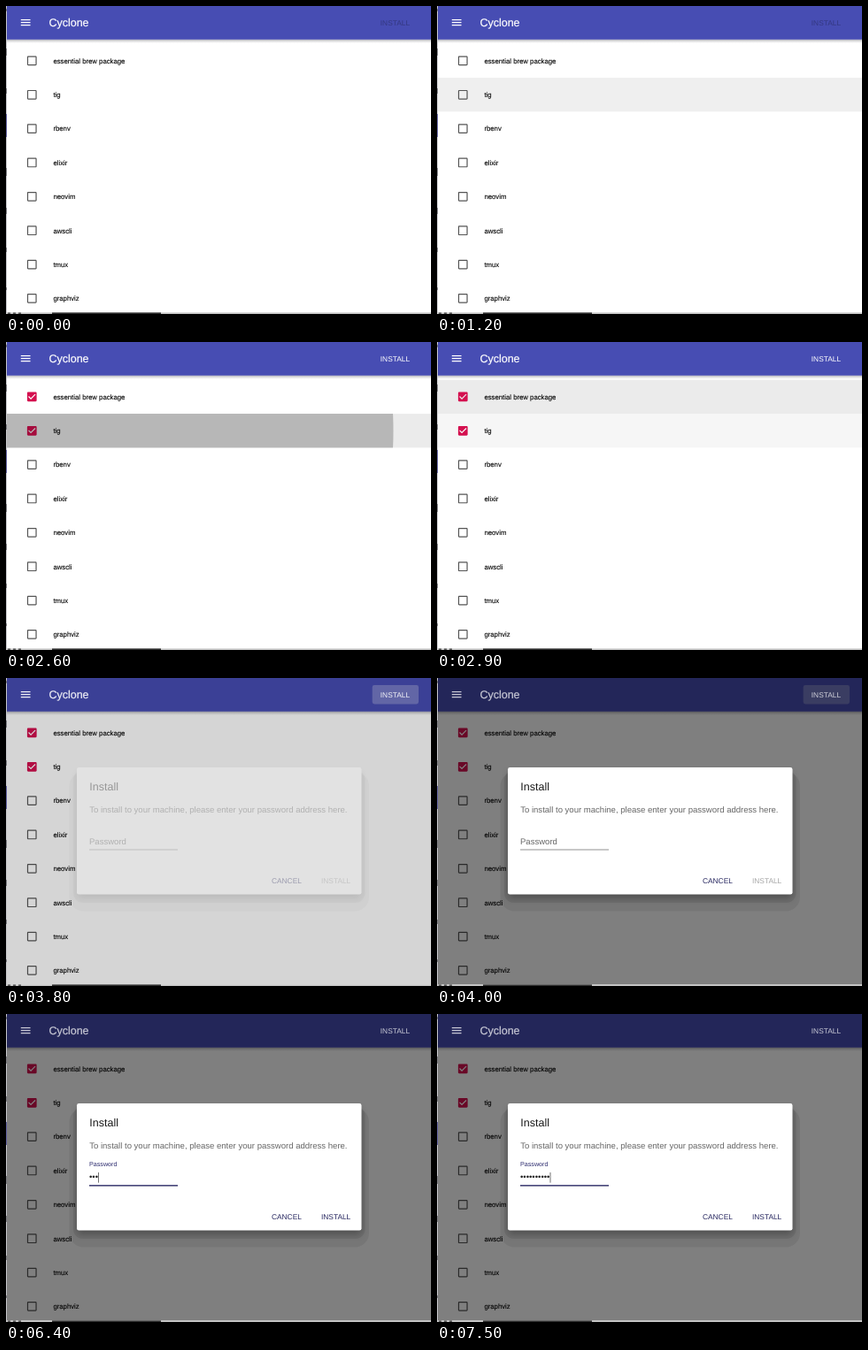
Recreate the animation shown at these times as an HTML page. Size 480 by 348 pixels, loop 8000 ms.

```html
<!DOCTYPE html>
<html lang="en">
<head>
<meta charset="utf-8">
<title>Package installer</title>
<style>
  html, body { margin: 0; width: 100%; height: 100%; overflow: hidden; background: #fff; }
  svg { display: block; width: 100vw; height: 100vh; }
  text {
    font-family: "Liberation Sans", Arial, Helvetica, sans-serif;
    white-space: pre;
    text-rendering: geometricPrecision;
  }
  .title { font-size: 12.5px; }
  .button { font-size: 8.36px; }
  .item { font-size: 7.76px; }
  .body { font-size: 9.55px; fill: #666; }
</style>
</head>
<body>
<svg viewBox="0 0 480 348">
  <defs>
    <linearGradient id="barShade" x2="0" y2="1">
      <stop offset="0" stop-color="#3c3f70" stop-opacity=".5"/>
      <stop offset=".5" stop-color="#555" stop-opacity=".17"/>
      <stop offset="1" stop-color="#555" stop-opacity="0"/>
    </linearGradient>
    <filter id="soft" x="-20%" y="-30%" width="140%" height="160%"><feGaussianBlur stdDeviation="4"/></filter>
    <path id="boxOff" fill="#555" d="M19 5v14H5V5h14m0-2H5c-1.1 0-2 .9-2 2v14c0 1.1.9 2 2 2h14c1.1 0 2-.9 2-2V5c0-1.1-.9-2-2-2z"/>
    <path id="boxOn" fill="#d4104f" d="M19 3H5c-1.11 0-2 .9-2 2v14c0 1.1.89 2 2 2h14c1.11 0 2-.9 2-2V5c0-1.1-.89-2-2-2zm-9 14l-5-5 1.41-1.41L10 14.17l7.59-7.59L19 8l-9 9z"/>
  </defs>

  <rect width="480" height="348" fill="#fff"/>
  <g id="list"></g>

  <!-- app bar -->
  <rect x="1" y="37.5" width="479" height="4.5" fill="url(#barShade)"/>
  <rect x="1" width="479" height="37.8" fill="#474db3"/>
  <rect id="barGlow" x="413.7" y="8" width="52.3" height="21.5" rx="2.4" fill="#fff"/>

  <rect id="dim" x="1" width="479" height="346.4"/>

  <g id="barText" fill="#fff">
    <path transform="translate(15 11.4) scale(.597)" d="M3 18h18v-2H3v2zm0-5h18v-2H3v2zm0-7v2h18V6H3z"/>
    <text class="title" x="48.4" y="23" stroke="#fff" stroke-width=".2">Cyclone</text>
    <text id="barInstall" class="button" x="422.8" y="21.5">INSTALL</text>
  </g>

  <!-- desktop visible around the window -->
  <g id="edges"></g>

  <g id="dialog">
    <rect x="71.5" y="106" width="338.5" height="157.5" rx="16" opacity=".07"/>
    <rect x="76" y="104" width="329.5" height="150" rx="11" opacity=".08"/>
    <rect x="81" y="107" width="319.5" height="141" opacity=".3" filter="url(#soft)"/>
    <rect x="80" y="101" width="321.5" height="143.6" rx="2.4" fill="#fff"/>
    <text class="title" x="94.3" y="126.6" fill="#1a1a1a">Install</text>
    <text class="body" x="94.2" y="152.2">To install to your machine, please enter your password address here.</text>
    <text id="label" class="body">Password</text>
    <rect x="94" y="193.6" width="100" height=".8" fill="#777"/>
    <rect id="line" y="193.2" height="1.2" fill="#2c2b6e"/>
    <text id="dots" class="body" x="94" y="187.1" style="fill:#222"></text>
    <rect id="caret" y="179" width=".7" height="11.6" fill="#333"/>
    <text class="button" x="300" y="232.2" fill="#26265f">CANCEL</text>
    <text id="submit" class="button" x="356" y="232.2">INSTALL</text>
  </g>
</svg>

<script>
const $ = id => document.getElementById(id);
function set(el, attrs) {
  for (const k in attrs) el.setAttribute(k, attrs[k]);
}
function make(tag, attrs, parent) {
  const el = document.createElementNS("http://www.w3.org/2000/svg", tag);
  set(el, attrs);
  parent.appendChild(el);
  return el;
}

const LOOP = 8000, STEP = 100;
const PITCH = 38.36, ROW_TOP = 42.7;
const names = ["essential brew package", "tig", "rbenv", "elixir", "neovim", "awscli", "tmux", "graphviz"];

const rows = names.map((name, i) => {
  const list = $("list"), y = ROW_TOP + i * PITCH, mid = y + 19.2;
  const area = { x: 1, y, width: 479, height: PITCH };
  make("rect", area, make("clipPath", { id: "clip" + i }, list));
  const hover = make("rect", { ...area, opacity: 0 }, list);
  const box = make("use", { href: "#boxOff", transform: `translate(22.1 ${mid - 7.16}) scale(.597)` }, list);
  make("text", { class: "item", x: 53.4, y: mid + 2.8, stroke: "#000", "stroke-width": .1 }, list).textContent = name;
  const ripple = make("circle", { cx: 29, cy: mid, opacity: 0, "clip-path": `url(#clip${i})` }, list);
  return { hover, box, ripple };
});

function edge(x, y, width, height, fill) {
  make("rect", { x, y, width, height, fill }, $("edges"));
}
edge(0, 0, 1, 348, "#c4c4c8");
for (let i = 0; i < 8; i++) edge(0, 3 + 45 * i, 1, 3 + i * 5 % 7, "#77777d");
edge(0, 122, 1, 26, "#5c5c9c");
edge(0, 346.4, 480, 1.6, "#c2c2c2");
edge(52, 346.4, 123, 1.6, "#2a2a2a");
for (let i = 0; i < 3; i++) edge(2 + 6 * i, 346.4, 3, 1.6, "#555");

const fade = (t, start, length) => Math.min(1, Math.max(0, (t - start) / length));

// Cubic bezier (x1, 0, .2, 1), solved for x by bisection
function ease(p, x1) {
  let lo = 0, hi = 1;
  for (let i = 0; i < 24; i++) {
    const u = (lo + hi) / 2, v = 1 - u;
    if (3 * x1 * u * v * v + 0.6 * u * u * v + u ** 3 < p) lo = u; else hi = u;
  }
  return 3 * lo * lo * (1 - lo) + lo ** 3;
}

// Per row: press time and the pointer's [enter, leave] visits
const actions = [
  { press: 1830, visits: [[950, 1050], [1650, 2125], [2750, 3150]] },
  { press: 2230, visits: [[1080, 1600], [2180, 2815]] }
];

function drawRow({ hover, box, ripple }, { press, visits }, t) {
  const over = visits.reduce((sum, [a, b]) => sum + fade(t, a, 150) - fade(t, b, 150), 0);
  set(hover, { opacity: .08 * over });
  set(box, { href: t >= press + 170 ? "#boxOn" : "#boxOff" });
  set(ripple, {
    r: 442 * ease(fade(t, press, 550), .4),
    opacity: .3 * (1 - fade(t, press + 270, 400))
  });
}

function drawBar(t, shown) {
  const enabled = t >= actions[0].press + 170;
  set($("barInstall"), { fill: enabled ? "#fff" : "#343881" });
  set($("barGlow"), { opacity: .25 * (fade(t, 3550, 150) - fade(t, 4900, 200)) });
  set($("barText"), { opacity: 1 - .25 * shown });
}

function drawDialog(t, shown) {
  set($("dim"), { opacity: shown / 2 });
  set($("dialog"), { opacity: shown });

  const focus = ease(fade(t, 4980, 240), 0);
  set($("label"), {
    transform: `translate(94 ${187.8 - 15.5 * focus}) scale(${1 - .25 * focus})`,
    style: `fill:${focus > 0 ? "#2c2b6e" : "#666"}`
  });
  set($("line"), { x: 144 - 50 * focus, width: 100 * focus });

  // Typing slows down towards the last character
  const pace = 1 - (1 - fade(t, 6200, 1300)) ** 1.6;
  const typed = t < 6000 ? 0 : 1 + Math.floor(9 * pace);
  const blinkOff = t >= 5600 && !typed;
  $("dots").textContent = "•".repeat(typed);
  set($("caret"), { x: 94.2 + 3.345 * typed, opacity: focus > 0 && !blinkOff ? 1 : 0 });
  set($("submit"), { fill: typed ? "#26265f" : "#a6a6a6" });
}

function draw(t) {
  const shown = ease(fade(t, 3720, 280), .4);
  actions.forEach((action, i) => drawRow(rows[i], action, t));
  drawBar(t, shown);
  drawDialog(t, shown);
}

const begin = performance.now();
function frame() {
  const t = (performance.now() - begin) % LOOP;
  draw(Math.floor(t / STEP) * STEP);
  requestAnimationFrame(frame);
}
frame();
</script>
</body>
</html>
```
